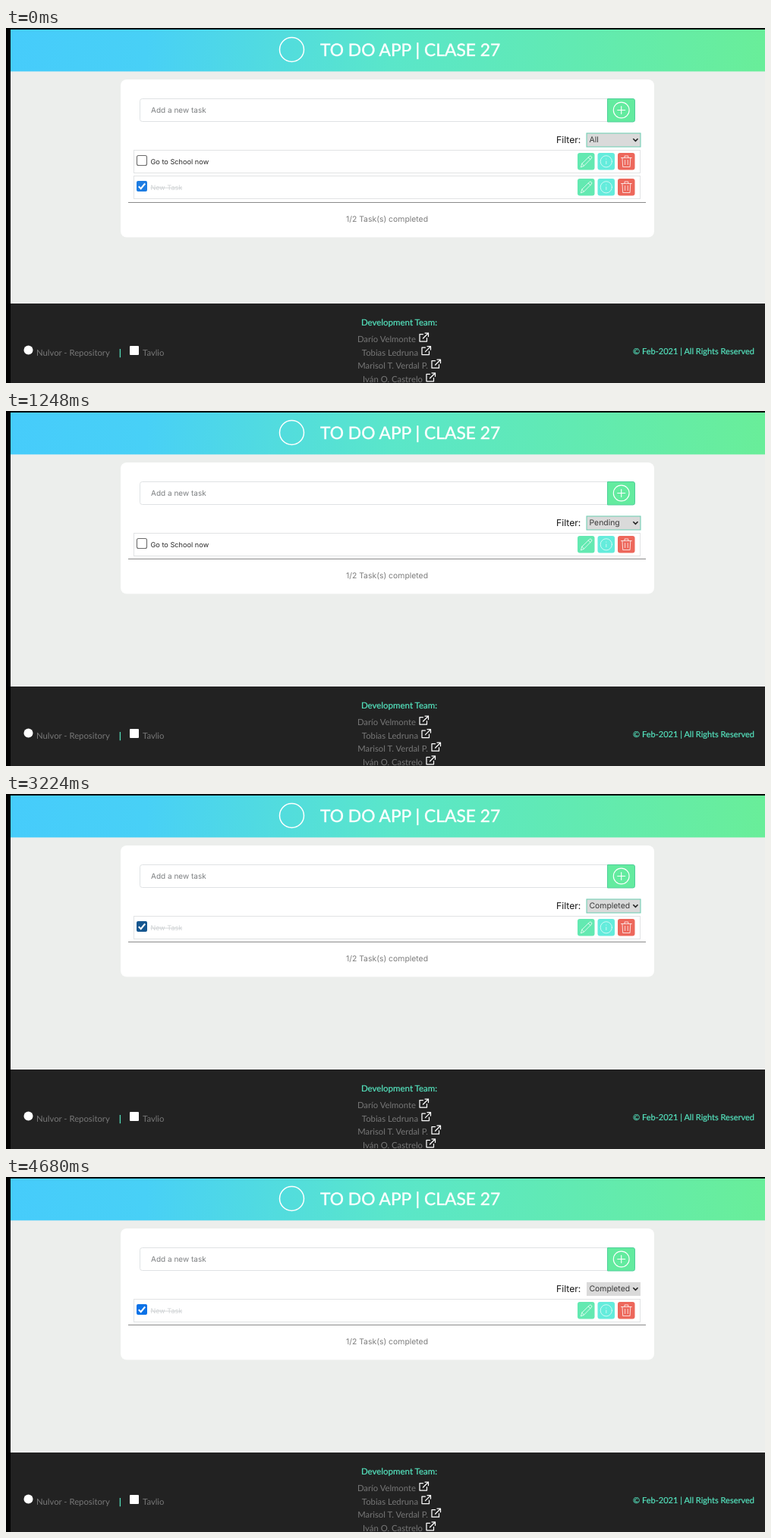
Recreate the animation shown at these times as an HTML page. Size 1000x469 px, loop 4.81 s.

```html
<!DOCTYPE html>
<html lang="en">
<head>
<meta charset="utf-8">
<title>To do app</title>
<style>
  html, body { margin: 0; width: 100%; height: 100%; overflow: hidden; background: #000; }
  svg { display: block; width: 100%; height: 100%; }
  text { font-family: Inter, sans-serif; text-rendering: geometricPrecision; }
  .lato text, text.lato { font-family: Lato, sans-serif; }
  .line { fill: none; stroke: #fff; stroke-linecap: round; stroke-linejoin: round; }
</style>
</head>
<body>
<svg id="stage" viewBox="0 0 1000 469" xmlns="http://www.w3.org/2000/svg">
  <defs>
    <linearGradient id="sky" gradientUnits="userSpaceOnUse" x1="6" y1="20" x2="1000" y2="75">
      <stop offset="0" stop-color="#46ccfb"/>
      <stop offset=".18" stop-color="#48d0f6"/>
      <stop offset=".5" stop-color="#5ae6ca"/>
      <stop offset="1" stop-color="#69ee99"/>
    </linearGradient>
    <g id="pencil" class="line" stroke-width=".9" stroke-opacity=".85">
      <path d="M4.5 18.5 5.8 14.2 15.8 4.4Q17 3.4 18.2 4.6 19.4 5.8 18.4 7L8.6 17ZM14.2 6 17 8.6M5.8 14.2 8.6 17"/>
    </g>
    <g id="info" class="line" stroke-width=".9" stroke-opacity=".75">
      <circle cx="11.3" cy="11.3" r="7.6"/>
      <path d="M11.3 11V14.5M11.3 8V8.2"/>
    </g>
    <g id="trash" class="line" stroke-width=".9" stroke-opacity=".85">
      <path d="M4.5 6.5H18.3M9 6.5V4H13.8V6.5M6 6.5 6.7 18.5H16.1L16.8 6.5M9.6 9.5V15.5M13.2 9.5V15.5"/>
    </g>
    <g id="open" class="line" stroke-width="1.25">
      <path d="M5.5 2.5H1V12H10.5V7.5M8 1H12.5V5.5M12.5 1 5.5 8"/>
    </g>
    <g id="tools"></g>
  </defs>

  <rect x="6" y="2" width="994" height="467" fill="#eceeec"/>
  <rect x="6" y="2" width="994" height="55.4" fill="url(#sky)"/>
  <circle cx="376.5" cy="28.5" r="16" class="line" stroke-width="1.5"/>
  <text class="lato" x="414" y="36.8" font-size="22.8" fill="#fff" stroke="#fff" stroke-width=".4">TO DO APP | CLASE 27</text>

  <rect id="card" x="151" y="68" width="703" rx="8" fill="#fff"/>
  <path d="M792 93.5H179.5Q176.5 93.5 176.5 96.5V120.5Q176.5 123.5 179.5 123.5H792" fill="#fff" stroke="#dfe2e4"/>
  <text x="191" y="112.3" font-size="10" fill="#7c7f81">Add a new task</text>
  <path d="M792.5 93.5H826Q828.5 93.5 828.5 96V121.5Q828.5 124 826 124H792.5Z" fill="#63eb9f" stroke="#50cf9b"/>
  <g class="line" stroke-width="1.1">
    <circle cx="810.7" cy="108.5" r="10.4"/>
    <path d="M805.7 108.5H815.7M810.7 103.5V113.5"/>
  </g>

  <text x="725" y="151.6" font-size="12.2" fill="#151515">Filter:</text>
  <rect id="box" x="765" y="139" width="71" height="18" fill="#dadada"/>
  <text id="choice" x="768.5" y="151.3" font-size="10.4" fill="#3a3a3a"></text>
  <path d="M826.3 146.3 829.4 149.4 832.5 146.3" fill="none" stroke="#222" stroke-width="1.6"/>

  <g id="todo">
    <use href="#tools"/>
    <rect x="172.5" y="168.5" width="13" height="13" rx="2" fill="#fff" stroke="#6a6a6a" stroke-width="1.1"/>
    <text x="190.5" y="179.8" font-size="9.2" fill="#2a2a2a">Go to School now</text>
  </g>
  <g id="done">
    <use href="#tools"/>
    <rect id="tick" x="172" y="168" width="14" height="14" rx="2"/>
    <path d="M174.8 175.2 177.7 178.2 183.2 171.5" fill="none" stroke="#fff" stroke-width="2"/>
    <text x="190.5" y="179.8" font-size="9" fill="#cfd2d4" text-decoration="line-through">New Task</text>
  </g>

  <g id="sum">
    <path d="M161 195.5H843" stroke="#898989"/>
    <text x="502" y="221.3" font-size="10.4" fill="#7c7c7c" text-anchor="middle">1/2 Task(s) completed</text>
  </g>

  <rect x="6" y="364" width="994" height="105" fill="#222"/>
  <g class="lato" font-size="11.3" fill="#777">
    <circle cx="29.5" cy="425.5" r="6" fill="#fff"/>
    <text x="40" y="433">Nulvor - Repository</text>
    <text x="149" y="433" fill="#55e4bf" stroke="#55e4bf" stroke-width=".5">|</text>
    <rect x="163" y="420" width="12" height="12" rx="1" fill="#fff"/>
    <text x="180" y="433">Tavlio</text>
    <g fill="#55e4bf" stroke="#55e4bf" stroke-width=".2">
      <text x="518" y="393.3" font-size="11.5" text-anchor="middle">Development Team:</text>
      <text x="986" y="430.6" font-size="11" text-anchor="end">© Feb-2021 | All Rights Reserved</text>
    </g>
    <g id="team"></g>
  </g>
</svg>
<script>
const $ = id => document.getElementById(id);
const LOOP = 4810;

$('tools').innerHTML =
  '<rect x="168.5" y="161.5" width="667" height="30" fill="#fff" stroke="#e1e3e4"/>' +
  [['pencil', 753, '#63e9b1'], ['info', 779.5, '#64ecdc'], ['trash', 806, '#ed675b']].map(([icon, x, color]) =>
    `<g transform="translate(${x} 165)"><rect width="22.5" height="22.5" rx="3" fill="${color}"/><use href="#${icon}"/></g>`
  ).join('');

$('team').innerHTML = [
  ['Darío Velmonte', 540], ['Tobias Ledruna', 543],
  ['Marisol T. Verdal P.', 556], ['Iván O. Castrelo', 549]
].map(([name, x], i) => {
  const y = 415 + i * 17.6;
  return `<text x="${x}" y="${y}" text-anchor="end">${name}</text>
    <use href="#open" x="${x + 4}" y="${y - 13}"/>`;
}).join('');
const lastMember = $('team').querySelector('text:last-of-type');

function draw(t) {
  const filter = t < 390 ? 'All' : t < 1820 ? 'Pending' : 'Completed';
  const all = filter === 'All';
  const hover = t >= 4160 && t < 4290;
  const focus = t < 4680;
  const shift = all ? 35 : 0;

  $('choice').textContent = filter;
  $('box').setAttribute('stroke', focus ? '#69cdb0' : 'none');
  $('card').setAttribute('height', 173.5 + shift);
  $('sum').setAttribute('transform', `translate(0 ${shift})`);
  $('done').setAttribute('transform', `translate(0 ${all ? 34 : 0})`);
  $('todo').style.display = filter === 'Completed' ? 'none' : '';
  $('done').style.display = filter === 'Pending' ? 'none' : '';
  $('tick').setAttribute('fill', all ? '#1d7ce2' : focus && !hover ? '#15568f' : '#0b72e7');
  lastMember.setAttribute('fill', hover ? '#fff' : '#777');
}

const start = performance.now();
function tick(now) {
  draw(Math.max(0, now - start) % LOOP);
  requestAnimationFrame(tick);
}
draw(0);
requestAnimationFrame(tick);
</script>
</body>
</html>
```
